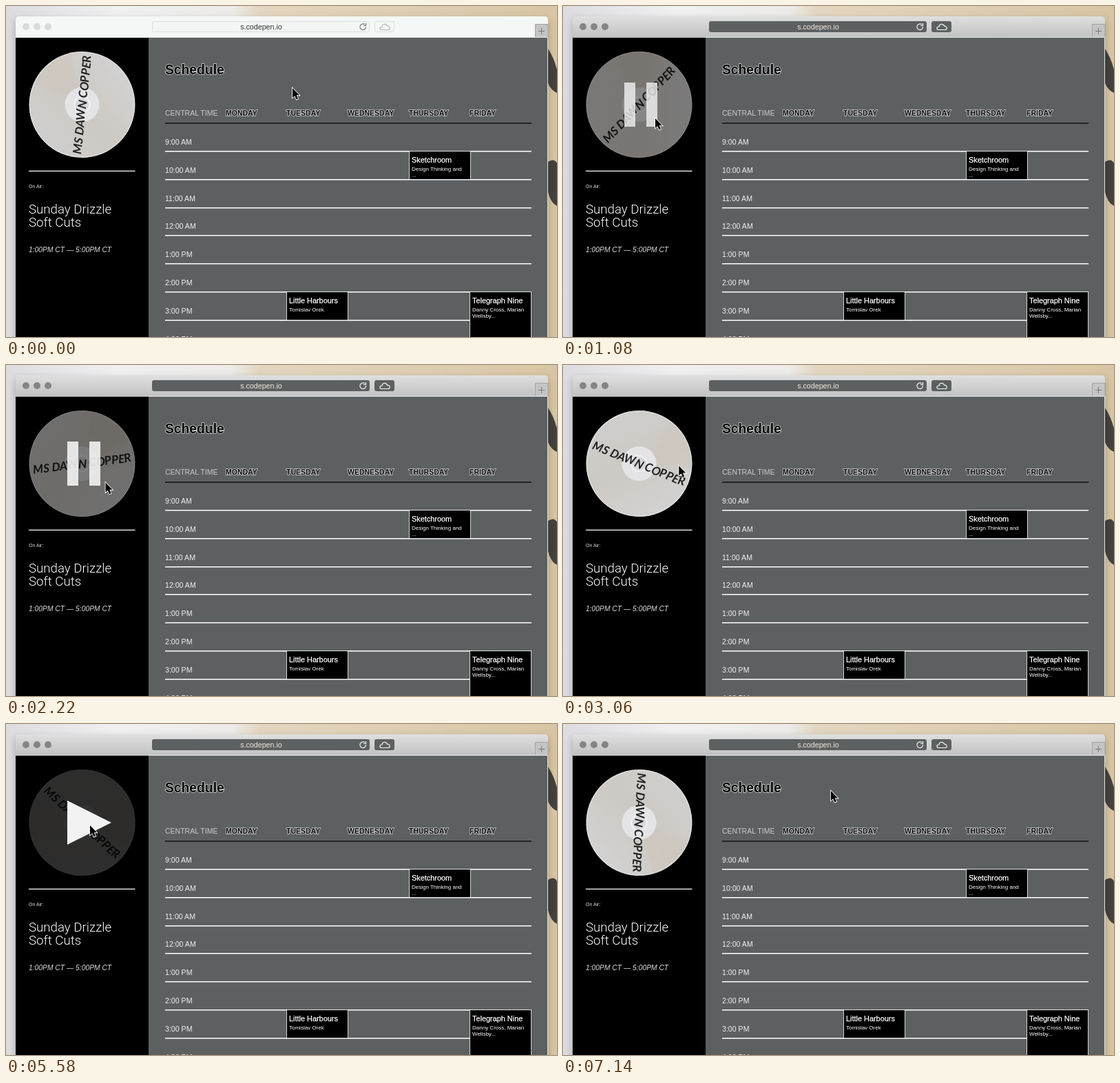
An HTML page that plays this animation: 800 px wide and 480 px high, repeating every 7.2 s.

```html
<!DOCTYPE html>
<html lang="en">
<head>
<meta charset="utf-8">
<title>Radio schedule</title>
<style>
html, body { margin: 0; width: 100%; height: 100%; overflow: hidden; background: #dcdce0; }
svg { display: block; width: 800px; height: 480px; font-family: "Liberation Sans", Arial, sans-serif; }
.lights { fill: #858587; }
.field { fill: #5d6061; stroke: #5d6061; }
.chrome-icon { fill: none; stroke: #f4f4f4; stroke-width: 1.2; }
.url { font-size: 10.7px; fill: #f1e7dc; text-anchor: middle; }
.idle .lights { fill: #d9dadb; }
.idle .field { fill: #f4f5f5; stroke: #dcdddd; }
.idle .chrome-icon { stroke: #777; }
.idle #cloud { stroke: #b5b6b6; }
.idle .url { fill: #333; }
.idle #bar { fill: #f5f6f6; }
.head { font-weight: 700; fill: #000; stroke: #fff; stroke-opacity: .8; stroke-width: 1.5px; paint-order: stroke; }
.day { font-size: 10.5px; }
.hour { font-size: 10.6px; fill: #f0f0f0; }
.rule { stroke: #fff; stroke-width: 1.4; }
.card { stroke: #fff; stroke-opacity: .8; }
.name { font-size: 10.9px; fill: #fff; stroke: #fff; stroke-width: .25px; }
.sub { font-size: 8px; fill: #fff; }
.show { font: 300 18.7px Roboto, "Liberation Sans", sans-serif; fill: #fff; }
.ink { font: italic 700 17px Lato, sans-serif; fill: #202022; text-anchor: middle; }
</style>
</head>
<body>
<svg id="stage" viewBox="0 0 800 480">
  <defs>
    <linearGradient id="wall">
      <stop offset="0" stop-color="#dcdce0"/><stop offset=".2" stop-color="#f0f0f1"/>
      <stop offset=".41" stop-color="#ecebe9"/><stop offset=".46" stop-color="#e3d6c0"/>
      <stop offset="1" stop-color="#d8c5a4"/>
    </linearGradient>
    <linearGradient id="barOn" x2="0" y2="1">
      <stop offset="0" stop-color="#dfdfdf"/><stop offset="1" stop-color="#c1c1c2"/>
    </linearGradient>
    <linearGradient id="plastic" x2="1" y2="1">
      <stop offset="0" stop-color="#d0d0d1"/><stop offset=".5" stop-color="#cdc9c3"/>
      <stop offset="1" stop-color="#d5d5d8"/>
    </linearGradient>
    <filter id="blur"><feGaussianBlur stdDeviation="6"/></filter>
  </defs>

  <rect width="800" height="480" fill="url(#wall)"/>
  <path d="M787 62Q795 74 800 92V126Q791 122 787 112ZM787 226Q796 220 800 228V290Q791 286 787 270Z" fill="#45423f"/>
  <rect x="14" y="20" width="773" height="480" opacity=".25" filter="url(#blur)"/>

  <path id="bar" d="M14 46V20Q14 15 19 15H782Q787 15 787 20V46Z" fill="url(#barOn)"/>
  <g class="lights">
    <circle cx="29" cy="30" r="5"/><circle cx="45" cy="30" r="5"/><circle cx="61" cy="30" r="5"/>
  </g>
  <rect class="field" x="212.5" y="22.5" width="315" height="15" rx="2"/>
  <rect class="field" x="535.5" y="22.5" width="28" height="15" rx="2"/>
  <text class="url" x="370.5" y="34">s.codepen.io</text>
  <path class="chrome-icon" d="M521 27A4.3 4.3 0 1 0 522.5 30M522.5 25V28.5H519"/>
  <path class="chrome-icon" id="cloud" d="M545 34.5H555Q558 34 557 31Q556 29 554 29.5Q552 25.5 548.5 26.5Q546 27.5 546 30Q542.5 30 543 33Q543.5 34.5 545 34.5Z"/>
  <path d="M768.5 46V26.5H787V46Z" fill="#c4c4c5" stroke="#a4a4a5"/>
  <path d="M773 36.5H782M777.5 32V41" stroke="#777"/>

  <rect x="14" y="46" width="193" height="434"/>
  <rect x="207" y="46" width="579" height="434" fill="#5d6061"/>
  <path d="M207 45.5H786.5V480" fill="none" stroke="#e4e5e5"/>

  <g transform="translate(110.5 143)">
    <g id="disc">
      <circle r="77" fill="url(#plastic)"/>
      <path d="M0 0L24 -73A77 77 0 0 1 73 -24Z" fill="#cbc3b5" opacity=".35"/>
      <circle r="76" fill="none" stroke="#e2e2e3"/>
      <circle r="25" fill="#e4e4e7"/>
      <circle r="11" fill="#d8d8dc" stroke="#f1f1f3" stroke-width="2"/>
      <text class="ink" id="label" y="6">MS DAWN COPPER</text>
    </g>
    <circle id="shade" r="77.5"/>
    <g id="icon" fill="#f2f2f2">
      <path id="pause" d="M-21.5 -32H-5.5V32H-21.5ZM10.5 -32H26.5V32H10.5Z"/>
      <path id="play" d="M-21.5 -32L42.5 0L-21.5 32Z"/>
    </g>
  </g>
  <path d="M33 239.300H187.500" stroke="#fff" stroke-width="1.3"/>
  <text x="33" y="264" font-size="7" fill="#ddd">On Air:</text>
  <text class="show" x="33" y="300.5">Sunday Drizzle</text>
  <text class="show" x="33" y="319.5">Soft Cuts</text>
  <text x="33" y="357" font-size="10.3" font-style="italic" fill="#ddd">1:00PM CT — 5:00PM CT</text>

  <text class="head" x="231" y="99" font-size="19.3">Schedule</text>
  <text class="day" x="231" y="159" fill="#c8cacb">CENTRAL TIME</text>
  <path d="M231 170H763" stroke="#111" stroke-width="1.6"/>
  <g id="table"></g>

  <path id="cursor" d="M0 0V14L3.2 11.2L5.6 16.6L8 15.5L5.7 10.3H10Z" stroke="#fff" stroke-width="1.7" paint-order="stroke"/>
</svg>
<script>
const $ = id => document.getElementById(id);
const text = (cls, x, y, s) => `<text class="${cls}" x="${x}" y="${y}">${s}</text>`;
const colX = day => Math.floor(319.2 + 88.65 * day);
const rowY = row => Math.round(211 + 40.83 * row);

function hourRow(row) {
  const h = 9 + row;
  const label = `${(h + 11) % 12 + 1}:00 ${h <= 12 ? 'AM' : 'PM'}`;
  return text('hour', 231, rowY(row) - 10, label) +
    `<path class="rule" d="M231 ${rowY(row) - .3}H763"/>`;
}

function card(day, row, length, name, ...lines) {
  const x = colX(day), y = rowY(row);
  return `<rect class="card" x="${x + .5}" y="${y - .5}" width="89" height="${41 * length}"/>` +
    text('name', x + 4, y + 16, name) +
    lines.map((s, i) => text('sub', x + 4, y + 28 + 9 * i, s)).join('');
}

const days = ['MONDAY', 'TUESDAY', 'WEDNESDAY', 'THURSDAY', 'FRIDAY'];
$('table').innerHTML =
  days.map((d, i) => text('head day', colX(i), 159, d)).join('') +
  Array.from({ length: 8 }, (_, row) => hourRow(row)).join('') +
  card(3, 0, 1, 'Sketchroom', 'Design Thinking and', '...') +
  card(1, 5, 1, 'Little Harbours', 'Tomislav Orek') +
  card(4, 5, 2, 'Telegraph Nine', 'Danny Cross, Marian', 'Wellsby...');

// Uneven lettering, as if written by hand.
const tilt = [...$('label').textContent].map((_, i) => 5 * Math.sin(2.3 * i));
$('label').setAttribute('rotate', tilt.join(' '));

const LOOP = 7200, STEP = 60, STOP = 3660, RESUME = 5700;
const SPIN = .0347, FADE = 300, DARK = .78;

// Where the pointer turns: time, x, y.
const turns = [
  [0, 416, 119], [780, 234, 170], [1080, 134, 163], [1860, 222, 231], [2280, 140, 167],
  [2700, 290, 155], [3250, 122, 143], [3900, 116, 111], [4500, 241, 253], [4920, 282, 135],
  [5280, 105, 97], [5580, 122, 147], [5700, 122, 147], [6240, 361, 110], [7140, 389, 97],
  [LOOP, 416, 119]
];
// When the pointer enters and leaves the disc.
const hovers = [[920, 1680], [2040, 2460], [3060, 5880]];

const clamp = v => Math.max(0, Math.min(1, v));
const ease = k => k * k * (3 - 2 * k);

function pointer(t) {
  const i = turns.findIndex(p => p[0] > t);
  const [t0, x0, y0] = turns[i - 1], [t1, x1, y1] = turns[i];
  const k = ease((t - t0) / (t1 - t0));
  return [x0 + (x1 - x0) * k, y0 + (y1 - y0) * k];
}

const hover = t => Math.max(...hovers.map(([enter, leave]) =>
  Math.min(clamp((t - enter) / FADE), clamp(1 - (t - leave) / FADE))));

function draw(now) {
  const t = Math.floor((now % LOOP) / STEP) * STEP;
  const spun = Math.min(t, STOP) + Math.max(0, t - RESUME);
  const stopped = t >= STOP && t < RESUME;
  const over = hover(t);
  $('stage').classList.toggle('idle', t < STEP);
  $('disc').setAttribute('transform', `rotate(${-84 + SPIN * spun})`);
  $('shade').setAttribute('opacity', DARK * over);
  $('icon').setAttribute('opacity', clamp(1.5 * over));
  $('pause').setAttribute('visibility', stopped ? 'hidden' : 'visible');
  $('play').setAttribute('visibility', stopped ? 'visible' : 'hidden');
  $('cursor').setAttribute('transform', `translate(${pointer(t)})`);
}

const start = performance.now();
function tick() {
  draw(performance.now() - start);
  requestAnimationFrame(tick);
}
tick();
</script>
</body>
</html>
```
